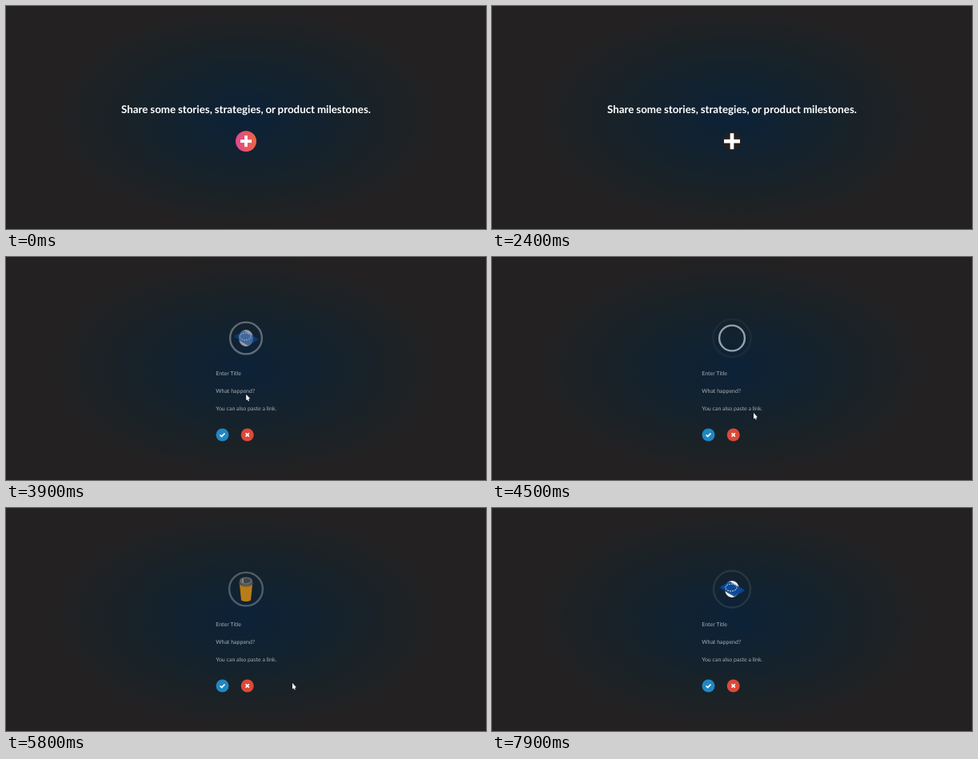
Animation, 600 px wide and 279 px high, one loop 8 s. Source, as an HTML page with a canvas:

```html
<!DOCTYPE html>
<html lang="en">
<head>
<meta charset="utf-8">
<style>
  html, body { margin: 0; height: 100%; overflow: hidden; }
  body { background: radial-gradient(245px 138px, #0c2238, #14222d 42%, #1b2226 72%, #232122) #232122; }
  canvas { display: block; width: 600px; height: 279px; }
</style>
</head>
<body>
<canvas id="stage"></canvas>
<script>
const LOOP = 8000, PULSE = 900, RING_LIFE = 1000;
const canvas = document.getElementById('stage');
const ctx = canvas.getContext('2d');
const scale = window.devicePixelRatio || 1;
canvas.width = 600 * scale;
canvas.height = 279 * scale;

const progress = (t, from, to) => Math.max(0, Math.min(1, (t - from) / (to - from)));
const smooth = p => p * p * (3 - 2 * p);
const mix = (a, b, p) => a + (b - a) * p;

function at(x, y, draw) {
  ctx.save();
  ctx.translate(x, y);
  draw();
  ctx.restore();
}

function disc(y, rx, fill, ry = rx) {
  ctx.beginPath();
  ctx.ellipse(0, y, rx, ry, 0, 0, 7);
  ctx.fillStyle = fill;
  ctx.fill();
}

function fillPath(fill, path) {
  ctx.fillStyle = fill;
  ctx.fill(new Path2D(path));
}

function pill(fill, x, y, w, h, r) {
  ctx.beginPath();
  ctx.roundRect(x, y, w, h, r);
  ctx.fillStyle = fill;
  ctx.fill();
}

function cross(arm, width) {
  ctx.fillStyle = '#fff';
  ctx.fillRect(-arm, -width / 2, 2 * arm, width);
  ctx.fillRect(-width / 2, -arm, width, 2 * arm);
}

function label(text, x, y, font, color, align = 'left', wordSpacing = '0px') {
  ctx.font = font + ' Lato, sans-serif';
  ctx.textAlign = align;
  ctx.wordSpacing = wordSpacing;
  ctx.textRendering = 'geometricPrecision';
  ctx.fillStyle = color;
  ctx.fillText(text, x, y);
}

// Isometric block: x runs down right, y down left, z up.
const AXIS = { x: [0.87, 0.5], y: [-0.87, 0.5], z: [0, -1] };

function face(color, x, y, z, u, v, width, height) {
  ctx.save();
  ctx.transform(...AXIS[u], ...AXIS[v], (x - y) * 0.87, (x + y) * 0.5 - z);
  ctx.fillStyle = color;
  ctx.fillRect(0, 0, width, height);
  ctx.restore();
}

function block(x, y, z, w, d, h, hue, saturation, light) {
  const tone = shade => `hsl(${hue} ${saturation}% ${light * shade}%)`;
  face(tone(1), x, y, z + h, 'x', 'y', w, d);
  face(tone(0.8), x, y + d, z, 'x', 'z', w, h);
  face(tone(0.9), x + w, y, z, 'y', 'z', d, h);
}

function bedEnd(x, height) {
  for (const y of [0, 13]) block(x, y, 0, 1.4, 1.4, 3, 32, 80, 48);
  block(x, 0, 3, 1.4, 14.4, height, 32, 80, 52);
}

function bed() {
  at(-2.3, -2, () => {
    bedEnd(0, 9);
    block(1.4, 0, 3, 18.6, 14, 1.5, 32, 80, 48);
    block(1.4, 0, 4, 18.6, 14, 3.5, 245, 20, 91);
    bedEnd(20, 3);
  });
}

function cup() {
  fillPath('#e29412', 'M-8 -6H8L6 14Q0 17 -6 14Z');
  disc(-7.5, 9, '#505257', 4.5);
  disc(-10.5, 8, '#74767a', 4.5);
  disc(-10.5, 6, '#383a3e', 3);
  pill('#999a9c', -5, -13, 2, 5, 1);
}

function darkObject() {
  pill('#29292b', -6, -13, 6, 22, 3);
  pill('#29292b', -6, -2, 14, 16, 4);
}

function tile() {
  disc(0, 9, '#e8edf3', 10.5);
  at(-0.5 - 2.3, -8, () => block(0, 0, 0, 21, 14, 1.6, 214, 84, 32));
  ctx.beginPath();
  ctx.ellipse(-1, -2, 7, 4.5, 0, 0, 7);
  ctx.setLineDash([2, 1]);
  ctx.strokeStyle = '#dbe6f3';
  ctx.lineWidth = 1;
  ctx.stroke();
  ctx.setLineDash([]);
}

const icons = [cup, darkObject, tile, bed, tile, cup];

function drawPrompt(t) {
  label('Share some stories, strategies, or product milestones.',
    300, 133.5, 'bold 13.33px', '#fff', 'center', '-0.4px');
  const fade = smooth(progress(t, 100, 1800));
  const grow = smooth(progress(t, 100, 2400));
  const pink = ctx.createLinearGradient(-13, 0, 13, 0);
  pink.addColorStop(0, '#e2488f');
  pink.addColorStop(1, '#ec6442');
  at(300, 169.2, () => {
    const alpha = ctx.globalAlpha;
    disc(0, 12, '#221f20');
    ctx.globalAlpha = alpha * (1 - fade);
    disc(0, 13, pink);
    ctx.globalAlpha = alpha;
    cross(mix(7, 10, grow), mix(3.8, 4.7, grow));
  });
}

function drawRing(age) {
  if (age >= RING_LIFE) return;
  const left = 1 - age / RING_LIFE;
  const alpha = Math.max(0.05, 0.65 * left ** 1.5);
  ctx.beginPath();
  ctx.arc(0, 0, 23.7 - 7.8 * left ** 2, 0, 7);
  ctx.strokeStyle = `rgba(225, 230, 235, ${alpha})`;
  ctx.lineWidth = 2.4;
  ctx.stroke();
}

function drawForm(t) {
  const age = t % PULSE;
  at(300, 101.5, () => {
    drawRing(age);
    drawRing(age + PULSE);
    ctx.globalAlpha *= Math.min(progress(age, 0, 500), 1 - progress(age, 780, 900));
    icons[Math.floor(t / PULSE) % icons.length]();
  });

  ['Enter Title', 'What happend?', 'You can also paste a link.'].forEach((text, i) =>
    label(text, 262.3, 147.8 + 22 * i, '7px', '#a9adb1'));

  at(270.5, 222.5, () => {
    disc(0, 8, '#2087c2');
    ctx.strokeStyle = '#fff';
    ctx.lineWidth = 1.6;
    ctx.stroke(new Path2D('M-3 0l2.1 2.1l3.9 -4'));
  });
  at(301.7, 222.5, () => {
    disc(0, 8, '#dc4937');
    ctx.rotate(Math.PI / 4);
    cross(3, 1.7);
  });
}

// Each move: start, end, then the distance covered.
const moves = [[2600, 2800, -90, 40], [3800, 4400, 29, 25], [4800, 5500, 31, 24]];

function drawCursor(t) {
  if (t < 2600 || t >= 7700) return;
  let x = 388, y = 130;
  for (const [from, to, dx, dy] of moves) {
    const p = smooth(progress(t, from, to));
    x += dx * p;
    y += dy * p;
  }
  at(x, y, () => {
    if (t >= 2750 && t < 3850) {
      pill('#fff', -1, 0, 2, 8, 1);
      pill('#fff', -3, 4.5, 7.5, 6.5, 2);
    } else {
      fillPath('#fff', 'M0 0V7.2L4.8 5.2ZM1.2 5L2.7 8.5L3.8 8L2.3 4.5Z');
    }
  });
}

function render(now) {
  const t = now % LOOP;
  const formAlpha = progress(t, 2950, 3200);
  ctx.setTransform(scale, 0, 0, scale, 0, 0);
  ctx.clearRect(0, 0, 600, 279);
  ctx.globalAlpha = 1 - formAlpha;
  if (formAlpha < 1) drawPrompt(t);
  ctx.globalAlpha = formAlpha;
  if (formAlpha > 0) drawForm(t);
  ctx.globalAlpha = 1;
  drawCursor(t);
  requestAnimationFrame(render);
}
requestAnimationFrame(render);
</script>
</body>
</html>
```
